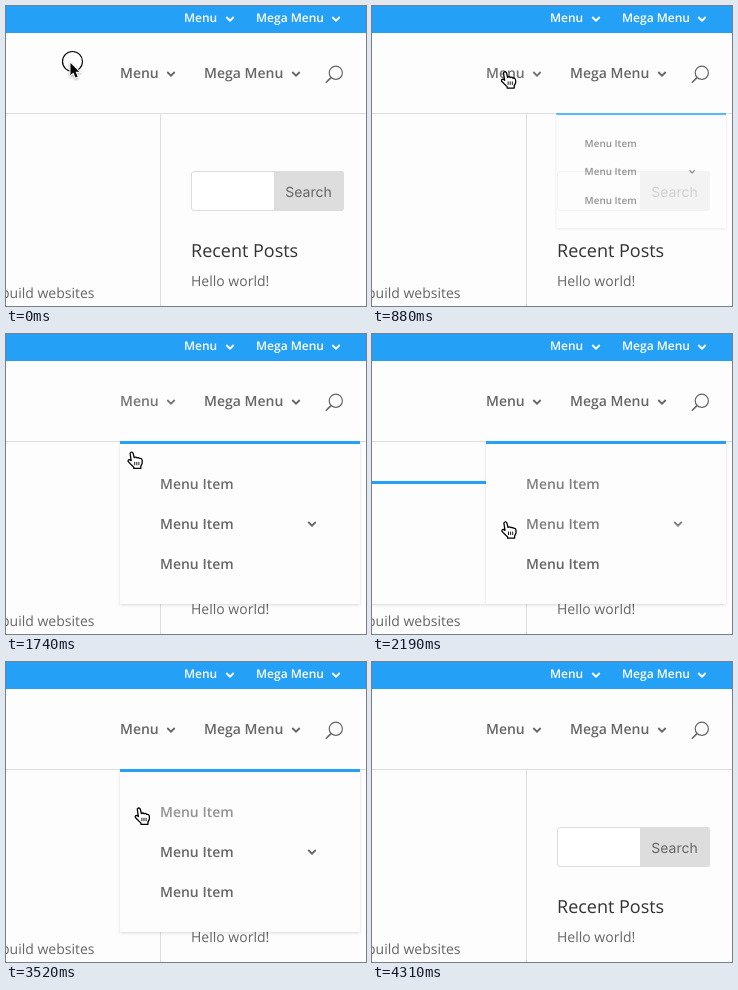
Recreate the animation shown at these times as an HTML page. Size 360 px wide and 300 px high, loop 5270 ms.

```html
<!DOCTYPE html>
<html lang="en">
<head>
<meta charset="utf-8">
<title>Dropdown menu</title>
<style>
  html, body { margin: 0; width: 100%; height: 100%; overflow: hidden; background: #fdfdfd; }
  svg { display: block; width: 360px; height: 300px; }
  text { font: 14px "Open Sans", sans-serif; fill: #666; text-rendering: geometricPrecision; }
  use { fill: none; stroke: #666; stroke-width: 1.8; }
  .link text { font-weight: 600; }
  .top text { font-size: 12px; fill: #fff; }
  .top use { stroke: #fff; }
  .panel { fill: #fdfdfd; filter: drop-shadow(0 1px 1.5px rgba(0, 0, 0, .14)); }
  .accent { fill: #24a1f7; }
  .rule { fill: #dedede; }
  #arrow { filter: drop-shadow(0 1px 1px rgba(0, 0, 0, .35)); }
</style>
</head>
<body>
<svg viewBox="0 0 360 300">
  <defs>
    <path id="chevron" d="M-3.7-2 0 1.7 3.7-2"/>
  </defs>

  <rect class="accent" width="360" height="27"/>
  <g class="link top">
    <text x="178" y="16">Menu</text><use href="#chevron" x="224" y="13"/>
    <text x="250" y="16">Mega Menu</text><use href="#chevron" x="330" y="13"/>
  </g>

  <rect class="rule" y="107" width="360" height="1"/>
  <rect class="rule" x="154" y="108" width="1" height="192"/>
  <g class="link" id="menuLink">
    <text x="114" y="72">Menu</text><use href="#chevron" x="165" y="68"/>
  </g>
  <g class="link">
    <text x="198" y="72">Mega Menu</text><use href="#chevron" x="290" y="68"/>
  </g>
  <g fill="none" stroke="#666" stroke-width="1.2">
    <circle cx="329.8" cy="66.8" r="6.6"/>
    <path d="M325 71.6 319.8 76.8" stroke-width="1.6"/>
  </g>

  <rect x="185.5" y="165.5" width="152" height="39" rx="2.5" fill="#fff" stroke="#ddd"/>
  <path d="M268 165h67a3 3 0 0 1 3 3v34a3 3 0 0 1-3 3h-67z" fill="#ddd"/>
  <text x="302.5" y="191" text-anchor="middle" style="font-family:Inter,sans-serif">Search</text>
  <text x="185" y="251" style="font-size:18px;fill:#333">Recent Posts</text>
  <text x="185" y="280">Hello world!</text>
  <text x="88.5" y="292" text-anchor="end">build websites</text>

  <!-- Both panels grow from their top right corner -->
  <g id="submenu">
    <rect class="panel" x="-240" width="240" height="123"/>
    <rect class="accent" x="-240" width="240" height="3"/>
    <g class="link">
      <text x="-200" y="48">Menu Item</text>
      <text x="-200" y="88">Menu Item</text>
    </g>
  </g>
  <g id="dropdown">
    <rect class="panel" x="-240" width="240" height="163"/>
    <rect class="accent" x="-240" width="240" height="3"/>
    <g class="link" id="item1"><text x="-200" y="48">Menu Item</text></g>
    <g class="link" id="item2">
      <text x="-200" y="88">Menu Item</text><use href="#chevron" x="-48" y="83"/>
    </g>
    <g class="link"><text x="-200" y="128">Menu Item</text></g>
  </g>

  <circle id="click" cx="66.5" cy="55.5" r="10" fill="none" stroke="#000" stroke-width="1.2"/>
  <path id="arrow" d="M0 0V12.2L2.9 9.6 5 14.6 7.2 13.7 5.1 8.8H8.8Z"
        stroke="#fff" stroke-width="2" paint-order="stroke"/>
  <g id="hand" stroke="#000" stroke-width="1.3" stroke-linejoin="round">
    <path fill="#fff" d="M-1 9.4-2 3A1.4 1.4 0 0 1 .8 1.8L2 6.4Q3.6 5.2 4.8 6.6 6.3 5.8 7.2 7.2
      9.8 6.8 10 9.4V12L8.6 15V17.2H1.6V16L-4 10.4Q-4.6 8.2-2.4 8.4Z"/>
    <path d="M2.5 10.6V14M4.6 10.6V14M6.7 10.6V14" stroke-width=".9"/>
  </g>
</svg>

<script>
const LOOP = 5270, STEP = 57.2, PHASE = 470;
const GROW = 200, FADE = 400;
const el = id => document.getElementById(id);

// Eases from 0 to 1 over the given duration.
function ramp(t, start, duration) {
  const u = Math.min(1, Math.max(0, (t - start) / duration));
  return u * u * (3 - 2 * u);
}

// Rises at one moment, falls back at another.
const pulse = (t, on, off, duration) => ramp(t, on, duration) - ramp(t, off, duration);

function show(id, visible) {
  el(id).style.display = visible ? "" : "none";
}

function dim(id, amount) {
  el(id).style.opacity = 1 - .3 * amount;
}

function placePanel(id, x, y, size) {
  show(id, size > .001);
  el(id).setAttribute("transform", `translate(${x} ${y}) scale(${size})`);
  el(id).style.opacity = size;
}

function placeCursor(t) {
  const reach = ramp(t, 440, 450);
  const descend = ramp(t, 1430, 660);
  const lift = ramp(t, 2715, 340);
  const leave = ramp(t, 3490, 170);
  const exit = ramp(t, 3890, 440);
  const x = 64.5 + 69.5 * reach - 8 * Math.sin(Math.PI * descend) - 46.5 * leave + 30 * exit;
  const y = 57 + 8 * reach ** 3 + 122 * descend - 42 * lift + 10 * leave + 157 * exit;

  const pointing = t > 735 && t < 3510;
  show("hand", pointing);
  show("arrow", !pointing && t < 4300);
  el(pointing ? "hand" : "arrow").setAttribute("transform", `translate(${x} ${y})`);
}

function draw() {
  const now = performance.now() % LOOP;
  // The picture advances in even steps, about 17 per second.
  const t = PHASE + Math.floor((now - PHASE) / STEP) * STEP;

  placePanel("dropdown", 354, 107, pulse(t, 742, 3545, GROW));
  placePanel("submenu", 114, 147, pulse(t, 1985, 2870, GROW));
  dim("menuLink", pulse(t, 740, 1480, FADE));
  dim("item1", pulse(t, 1620, 2000, FADE) + ramp(t, 2880, FADE));
  dim("item2", pulse(t, 1985, 2880, FADE));
  placeCursor(t);
  show("click", now < 50);
  requestAnimationFrame(draw);
}
draw();
</script>
</body>
</html>
```
